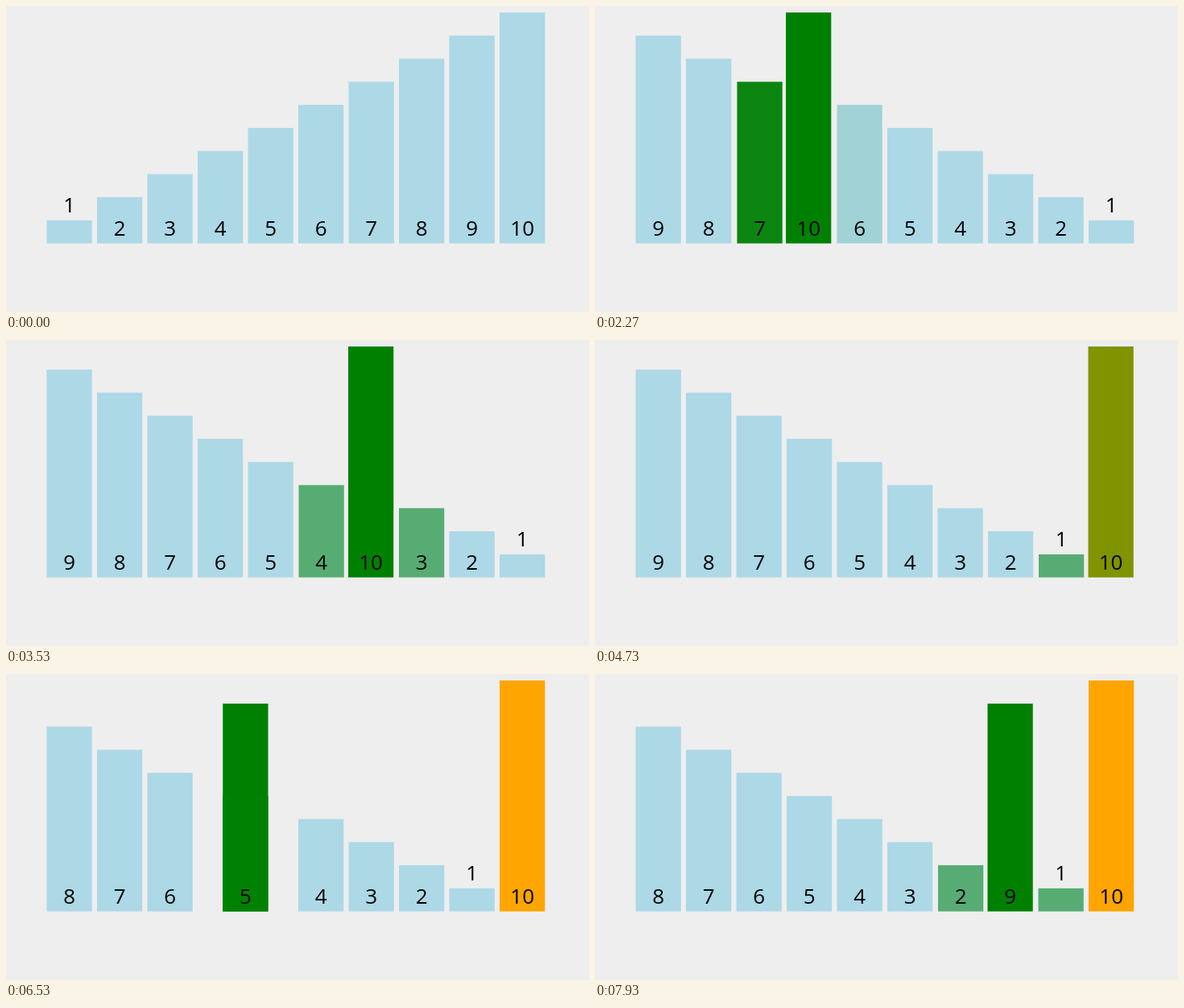
An HTML page with a canvas for the animation above (8000 ms loop, 724x381 px).

```html
<!DOCTYPE html>
<html lang="en">
<head>
<meta charset="utf-8">
<title>Bubble sort</title>
<style>
  html, body { margin: 0; width: 100%; height: 100%; overflow: hidden; background: #eee; }
  canvas { display: block; }
</style>
</head>
<body>
<canvas id="stage" width="724" height="381"></canvas>
<script>
const ctx = document.getElementById('stage').getContext('2d');

const LOOP = 8000;
const COUNT = 10;
const LEFT = 50.5, PITCH = 62.5, WIDTH = 56.25;
const BASE = 295.6, UNIT = 28.75;
const LABEL_Y = 286;

const BLUE = [173, 216, 230];
const GREEN = [0, 128, 0];
const ORANGE = [255, 165, 0];

const RESET_START = 365, RESET_TIME = 500;
const SORT_START = 1006, STEP = 200, FADE = 250;
const LAG = 10; // a running transition lasts this long into the next step

const clamp = v => Math.max(0, Math.min(1, v));
const mix = (a, b, k) => a + (b - a) * k;
const ease = v => {
  const u = clamp(v);
  return u < 0.5 ? 4 * u ** 3 : 1 - 4 * (1 - u) ** 3;
};

// Each step lists, per bar, its slot and colour. Bar i has the value COUNT - i.
function buildSteps() {
  const steps = [];
  const order = Array.from({ length: COUNT }, (_, i) => i);
  let sorted = COUNT;

  function record(active) {
    const step = [];
    order.forEach((bar, slot) => {
      const color = slot >= sorted ? ORANGE
        : slot === active || slot === active + 1 ? GREEN : BLUE;
      step[bar] = { slot, color };
    });
    steps.push(step);
  }

  while (sorted > 1) {
    for (let j = 0; j < sorted - 1; j++) {
      record(j);
      [order[j], order[j + 1]] = [order[j + 1], order[j]];
      record(j);
    }
    sorted--;
    record(-2);
    record(-2);
  }
  return steps;
}

const steps = buildSteps();

// Follow a bar through its interrupted transitions up to time t.
function barState(bar, t) {
  let slot = bar;
  let color = BLUE;
  for (let i = 0; i < steps.length; i++) {
    const start = SORT_START + i * STEP;
    if (t < start + LAG) break;
    const k = ease((Math.min(t, start + STEP + LAG) - start) / FADE);
    const goal = steps[i][bar];
    slot = mix(slot, goal.slot, k);
    color = color.map((c, n) => mix(c, goal.color[n], k));
  }
  return { slot, color };
}

const labelY = value => value === 1 ? LABEL_Y - UNIT : LABEL_Y;

function drawBar(bar, t) {
  const before = bar + 1, after = COUNT - bar;
  const k = ease((t - RESET_START) / RESET_TIME);
  const { slot, color } = barState(bar, t);
  const x = LEFT + slot * PITCH;
  const height = mix(before, after, k) * UNIT;

  ctx.fillStyle = `rgb(${color.map(Math.round).join(',')})`;
  ctx.fillRect(x, BASE - height, WIDTH, height);
  ctx.fillStyle = '#000';
  ctx.fillText(t < RESET_START ? before : after,
    x + WIDTH / 2, mix(labelY(before), labelY(after), k));
}

function draw(t) {
  ctx.fillStyle = '#eee';
  ctx.fillRect(0, 0, 724, 381);
  ctx.font = '26px "Open Sans", "Noto Sans", sans-serif';
  ctx.textAlign = 'center';
  for (let i = 0; i < COUNT; i++) drawBar(i, t);
}

function tick() {
  draw(performance.now() % LOOP);
  requestAnimationFrame(tick);
}
tick();
</script>
</body>
</html>
```
